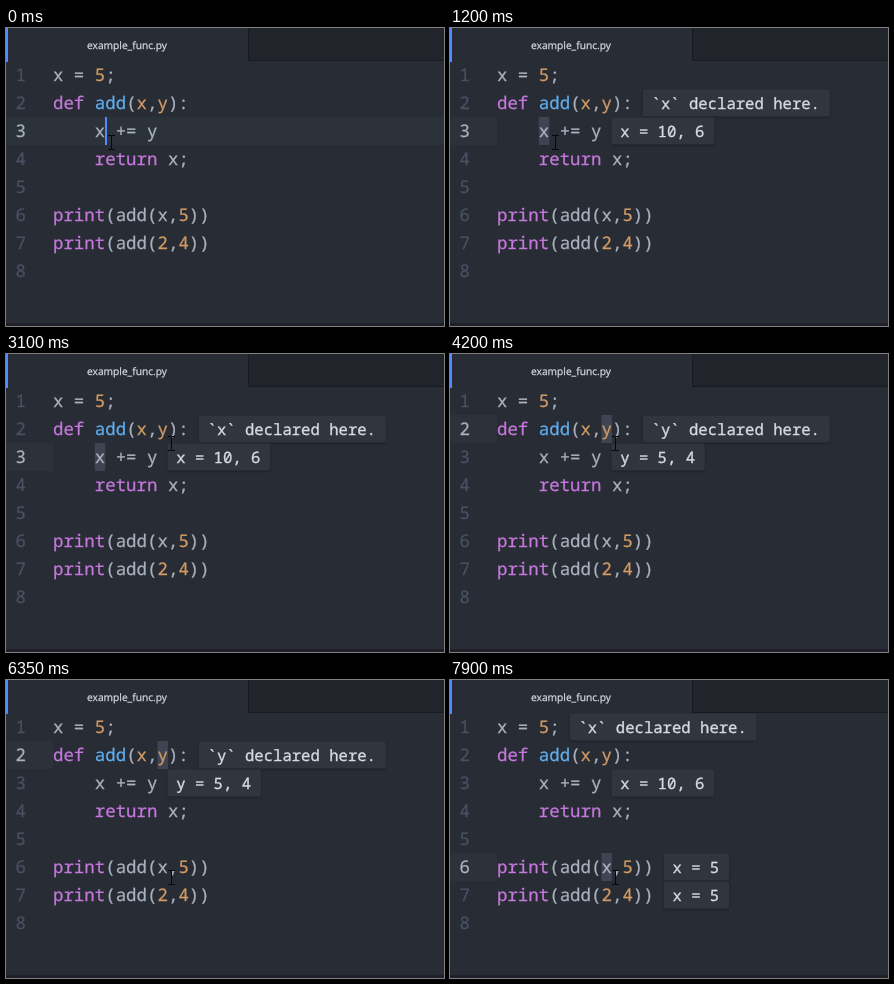
These frames come from a looping animation (438x298 px, 8 s). An HTML page:

```html
<!DOCTYPE html>
<html lang="en">
<head>
<meta charset="utf-8">
<title>Editor</title>
<style>
html, body { margin: 0; width: 100%; height: 100%; overflow: hidden; background: #282c34; }
svg { display: block; }
text { white-space: pre; text-rendering: geometricPrecision; fill: currentColor; stroke: currentColor; stroke-width: .25; font: 17.4px "Noto Sans Mono", "DejaVu Sans Mono", monospace; }
.title { font: 10.2px "Open Sans", "Noto Sans", sans-serif; color: #d7dae0; text-anchor: middle; }
.tip text { font-size: 15.6px; font-weight: 500; color: #d7dae0; stroke-width: .35; }
.tip rect { fill: #30353e; filter: drop-shadow(0 1px 1px #15181c99); }
</style>
</head>
<body>
<svg id="stage" width="438" height="298" viewBox="0 0 438 298"></svg>
<script>
const LOOP = 8000, LEFT = 47, CHAR = 10.45, ROW = 28, TIP_CHAR = 9.36, FADE = 150;
const stage = document.getElementById("stage");
const rowTop = row => 33 + ROW * (row - 1);
const colX = col => LEFT + CHAR * col;

// Prefixes: k keyword, n number or parameter, f function, p plain
const lines = [
  "p:x = |n:5|p:;",
  "k:def |f:add|p:(|n:x|p:,|n:y|p:):",
  "p:    x += y",
  "k:    return|p: x;",
  "",
  "k:print|p:(add(x,|n:5|p:))",
  "k:print|p:(add(|n:2|p:,|n:4|p:))",
  ""
];
const colors = { p: "#abb2bf", k: "#c678dd", n: "#d19a66", f: "#61afef" };

// Each click places the caret, then selects a letter and shows its tips
const clicks = [
  { at: 0, select: 150, show: 400, row: 3, col: 4,
    tips: [[2, "`x` declared here."], [3, "x = 10, 6"]] },
  { at: 3250, select: 3450, show: 3850, row: 2, col: 10,
    tips: [[2, "`y` declared here."], [3, "y = 5, 4"]] },
  { at: 7100, select: 7300, show: 7750, row: 6, col: 10,
    tips: [[1, "`x` declared here."], [3, "x = 10, 6"], [6, "x = 5"], [7, "x = 5"]] }
];
const moves = [
  { from: 2600, to: 3100, dx: 60, dy: -25 },
  { from: 5750, to: 6350, dx: 0, dy: 108 }
];

function add(tag, attrs, parent = stage, content = "") {
  const el = document.createElementNS("http://www.w3.org/2000/svg", tag);
  for (const key in attrs) el.setAttribute(key, attrs[key]);
  el.textContent = content;
  return parent.appendChild(el);
}
const rect = (x, y, width, height, fill) => add("rect", { x, y, width, height, fill });
const write = (x, y, color, content) => add("text", { x, y, color }, stage, content);
const show = (el, on) => el.setAttribute("opacity", +on);
const clamp = v => Math.max(0, Math.min(1, v));
const ease = v => v * v * (3 - 2 * v);

rect(0, 0, 438, 298, "#282c34");
rect(242, 0, 196, 33, "#21252b");
rect(242, 32, 196, 1, "#181a1f");
rect(242, 0, 1, 33, "#181a1f");
rect(0, 0, 2, 34, "#528bff");
rect(0, 295, 438, 3, "#211f2a");
add("text", { x: 121, y: 21, class: "title" }, stage, "example_func.py");

const gutter = rect(0, 0, LEFT, ROW, "#2c313a");
const band = rect(0, 0, 438, ROW, "#2b323a");
const selection = rect(0, 0, CHAR, ROW, "#3e4451");

const ends = [], numbers = [];
lines.forEach((line, i) => {
  const y = rowTop(i + 1) + 20;
  let col = 0;
  numbers.push(write(9.5, y, "#495162", i + 1));
  for (const token of line ? line.split("|") : []) {
    const content = token.slice(2), body = content.trimStart();
    write(colX(col + content.length - body.length), y, colors[token[0]], body);
    col += content.length;
  }
  ends.push(colX(col));
});

const caret = rect(0, 0, 2, ROW, "#528bff");

for (const click of clicks) {
  click.group = add("g", { class: "tip" });
  for (const [row, label] of click.tips) {
    const x = ends[row - 1] + 10, y = rowTop(row);
    add("rect", { x, y: y + .5, width: label.length * TIP_CHAR + 18.5, height: 27, rx: 2 }, click.group);
    add("text", { x: x + 8.7, y: y + 20 }, click.group, label);
  }
}

const mouse = add("path", { d: "M-3.5 -7h3l.5 .5 .5 -.5h3M0 -7V7M-3.5 7h3l.5 -.5 .5 .5h3",
  fill: "none", stroke: "#050608" });

function draw(t) {
  const now = clicks.findLast(c => t >= c.at);
  const y = rowTop(now.row), selected = t >= now.select;
  for (const el of [gutter, band, selection, caret]) el.setAttribute("y", y);
  selection.setAttribute("x", colX(now.col));
  caret.setAttribute("x", colX(now.col + 1) - .25);
  show(selection, selected);
  show(caret, !selected);
  show(band, !selected);
  numbers.forEach((el, i) => el.setAttribute("color", i + 1 === now.row ? "#abb2bf" : "#495162"));

  clicks.forEach((c, i) => {
    const end = clicks[i + 1]?.at ?? LOOP;
    show(c.group, clamp((t - c.show) / FADE) * clamp(1 - (t - end) / FADE));
  });

  let mx = 105.5, my = 114.5;
  for (const m of moves) {
    const k = ease(clamp((t - m.from) / (m.to - m.from)));
    mx += m.dx * k;
    my += m.dy * k;
  }
  mouse.setAttribute("transform", `translate(${mx} ${my})`);
}

const start = performance.now();
function tick() {
  draw((performance.now() - start) % LOOP);
  requestAnimationFrame(tick);
}
tick();
</script>
</body>
</html>
```
